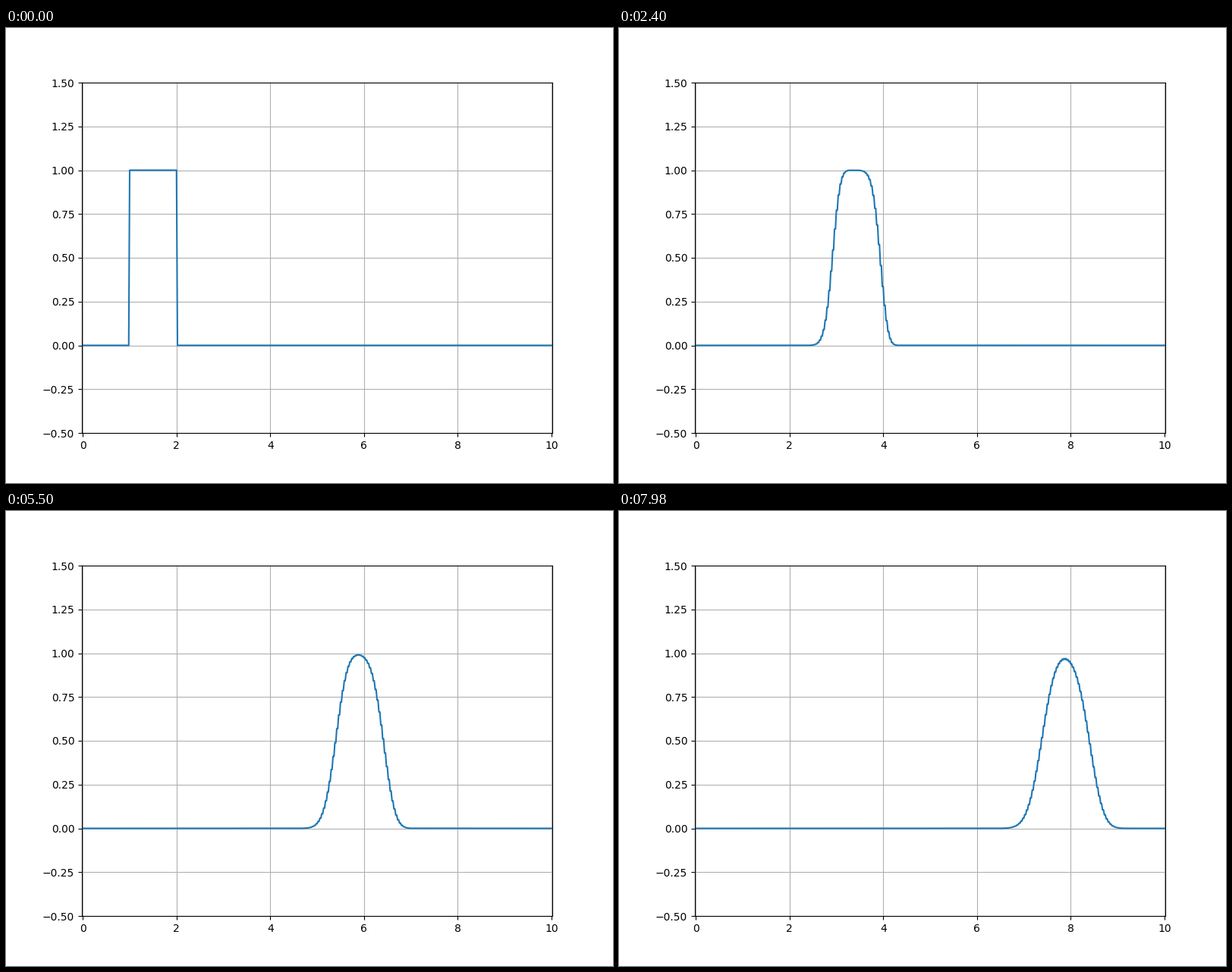
A matplotlib script for the animation above (8 s loop, 800 px wide and 600 px high).

```python
import numpy as np
import matplotlib.pyplot as plt
from matplotlib.animation import FuncAnimation

# Square pulse advected with the Lax-Friedrichs scheme
DX = 0.02
CELLS = 500
COURANT = 0.8
FRAMES = 400
INTERVAL = 20

# One ghost cell on each side of [0, 10]
x = np.arange(-1, CELLS + 2) * DX


def lax_step(u):
    new = u.copy()
    new[1:-1] = 0.5 * ((1 + COURANT) * u[:-2] + (1 - COURANT) * u[2:])
    new[0], new[-1] = new[1], new[-2]
    return new


def solve(u, steps):
    states = [u]
    for _ in range(steps - 1):
        states.append(lax_step(states[-1]))
    return states


pulse = np.where((x > 1 - DX / 2) & (x < 2 + DX / 2), 1.0, 0.0)
states = solve(pulse, FRAMES)

fig, ax = plt.subplots(figsize=(8, 6), dpi=100)
ax.set_xlim(x[0], x[-1])
ax.set_ylim(-0.5, 1.5)
ax.grid(True)
line, = ax.plot(x, states[0])


def update(n):
    line.set_ydata(states[n])
    return line,


anim = FuncAnimation(fig, update, frames=FRAMES, interval=INTERVAL,
                     repeat=True, repeat_delay=0)
plt.show()
```
